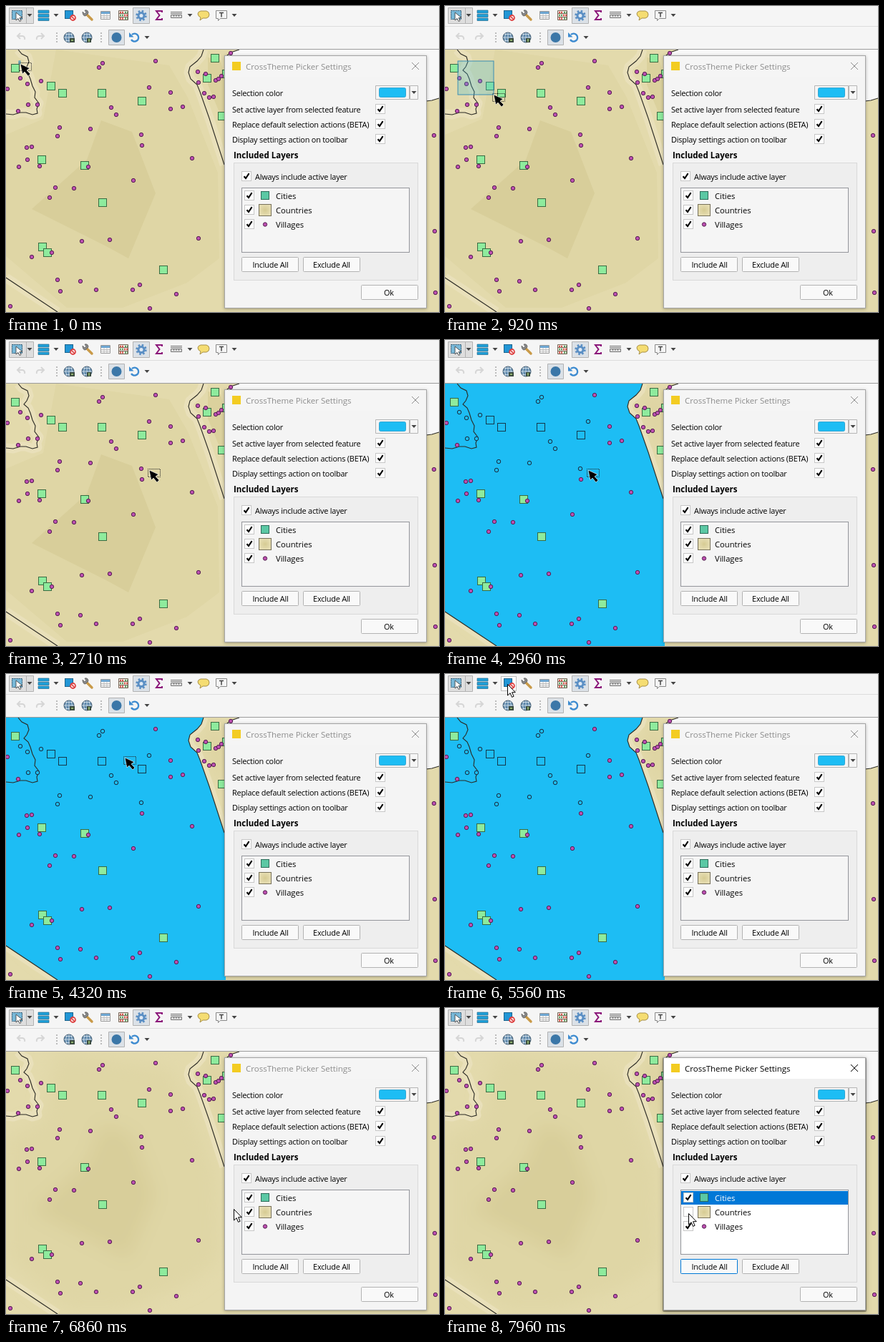
An HTML page for the animation above (8 s loop, 605 by 428 pixels).

```html
<!DOCTYPE html>
<html lang="en">
<head>
<meta charset="utf-8">
<title>Layer selection</title>
<style>
@property --x { syntax: "<number>"; inherits: true; initial-value: 20; }
@property --y { syntax: "<number>"; inherits: true; initial-value: 81; }
html, body { margin: 0; width: 100%; height: 100%; overflow: hidden; background: #f5f5f5; }
svg { display: block; }
text { font: 10.9px "Open Sans", "Noto Sans", sans-serif; letter-spacing: -.22px; fill: #000; }
.list text { font-size: 11.2px; letter-spacing: 0; }
.mid { text-anchor: middle; }
#stage { animation: path 8s step-end infinite; }
#stage [style*="--a"] { animation: var(--a) 8s step-end infinite; }
.at { transform: translate(calc(var(--x) * 1px), calc(var(--y) * 1px)); }
#band { width: calc((var(--x) - 18) * 1px); height: calc((var(--y) - 77) * 1px); }
#dialog { filter: drop-shadow(0 1px 2px rgba(0,0,0,.3)); }

@keyframes path {
  0% { --x: 20; --y: 81 }
  1.5% { --x: 23; --y: 85 }
  3% { --x: 26; --y: 90 }
  4.875% { --x: 33; --y: 95 }
  6.5% { --x: 40; --y: 101 }
  8% { --x: 48; --y: 108 }
  9.625% { --x: 56; --y: 114 }
  11.5% { --x: 68; --y: 124 }
  13% { --x: 80; --y: 133 }
  14.875% { --x: 99; --y: 145 }
  16.625% { --x: 117; --y: 153 }
  18.5% { --x: 136; --y: 159 }
  20.125% { --x: 154; --y: 165 }
  22% { --x: 172; --y: 172 }
  23.5% { --x: 188; --y: 178 }
  25.375% { --x: 195; --y: 181 }
  27% { --x: 200; --y: 182 }
  54% { --x: 166; --y: 117 }
  55.75% { --x: 118; --y: 58 }
  57.375% { --x: 89; --y: 20 }
  59.25% { --x: 87; --y: 14 }
  76.75% { --x: 77; --y: 35 }
  78.625% { --x: 140; --y: 112 }
  80.125% { --x: 203; --y: 190 }
  82% { --x: 253; --y: 246 }
  83.875% { --x: 304; --y: 277 }
  85.75% { --x: 318; --y: 281 }
  87.25% { --x: 333; --y: 290 }
  88.75% { --x: 340; --y: 286 }
  90.625%, 100% { --x: 340; --y: 287 }
}
@keyframes drag { 0% { visibility: visible } 33.875%, 100% { visibility: hidden } }
@keyframes banded { 0% { visibility: visible } 37%, 100% { visibility: hidden } }
@keyframes picked { 0% { visibility: hidden } 37% { visibility: visible } 73%, 100% { visibility: hidden } }
@keyframes smooth { 0% { visibility: hidden } 37%, 100% { visibility: visible } }
@keyframes cross {
  0% { visibility: visible } 55.75% { visibility: hidden }
  78.625% { visibility: visible } 83.875%, 100% { visibility: hidden }
}
@keyframes arrow {
  0% { visibility: hidden } 55.75% { visibility: visible }
  78.625% { visibility: hidden } 85.75%, 100% { visibility: visible }
}
@keyframes resize { 0% { visibility: hidden } 83.875% { visibility: visible } 85.75%, 100% { visibility: hidden } }
@keyframes hover {
  0% { visibility: hidden; fill: #fff } 57.375% { visibility: visible; fill: #fff }
  67.625% { visibility: visible; fill: #d4d8dc } 69.5% { visibility: visible; fill: #fff }
  76.75%, 100% { visibility: hidden; fill: #fff }
}
@keyframes active { 0% { visibility: hidden } 97.625%, 100% { visibility: visible } }
@keyframes ink { 0% { fill: #8c8c8c; stroke: #8c8c8c } 97.625%, 100% { fill: #000; stroke: #000 } }
@keyframes paper { 0% { fill: #f5f5f5 } 97.625%, 100% { fill: #fff } }
@keyframes face { 0% { fill: #f4f4f4 } 97.625%, 100% { fill: #f0f0f0 } }
@keyframes invert { 0% { fill: #000 } 97.625%, 100% { fill: #fff } }
@keyframes uncheck { 0% { visibility: visible } 99.5%, 100% { visibility: hidden } }
</style>
</head>
<body>
<svg id="stage" width="605" height="428" viewBox="0 0 605 428">
  <defs>
    <clipPath id="view"><rect y="61" width="605" height="367"/></clipPath>
    <filter id="soft" x="-20%" y="-20%" width="140%" height="140%"><feGaussianBlur stdDeviation="13"/></filter>
    <radialGradient id="sand"><stop offset="0" stop-color="#d6cb93"/><stop offset="1" stop-color="#e6ddb2"/></radialGradient>
    <path id="drop" d="M-3.5-2h7L0 2z" fill="#444"/>
    <rect id="frame" width="13" height="13" x=".5" y=".5" fill="#fff" stroke="#c6c6c6"/>
    <path id="tick" d="M3.5 7.2 6 10l4.6-6.8" fill="none" stroke="#000" stroke-width="2.1"/>
    <g id="box"><use href="#frame"/><use href="#tick"/></g>
    <g id="grip" fill="#bbb"><path d="M0 0h2v2H0zM0 4h2v2H0zM0 8h2v2H0zM0 12h2v2H0z"/></g>
    <g id="globe"><circle r="7" fill="#5d87ab" stroke="#3c5468"/><path d="M-7 0H7M0-7V7M-5-4.5H5M-5 4.5H5M-3-6Q-6 0-3 6M3-6Q6 0 3 6" fill="none" stroke="#dbe6ee" stroke-width=".8"/></g>
    <path id="coast" d="M17 61l5 6 8 4 2 7-3 7-4 5 6 5 3 7 3 10 4 8-1 8 6 8-3 8 1 6-7 2-9-3h-8l-10 3-10-1"/>
    <path id="east" d="M276 61l-3 9-6 7-10 8-2 8 3 9 9 8 4 10 13 37 21 65"/>
    <path id="north" d="M326 61l-12 4-6 5M587 133l8-1 10-3"/>
    <path id="south" d="M0 380l72 48"/>
    <g id="relief">
      <path d="M70 61l158 22 26 45 42 105 2 120-45 34-90 35H85L0 350V180l52-22z" fill="#dfd6a5"/>
      <path d="M133 160l43 16 33 86-38 91-31-17-104-52 77-69z" fill="#d8ce9a"/>
      <path d="M282 72l18 4 7 30v64l-25-60z" fill="#dbd19d"/>
    </g>
  </defs>

  <g clip-path="url(#view)">
    <rect y="61" width="605" height="367" fill="#e3daac"/>
    <use href="#relief" style="--a:banded"/>
    <use href="#relief" filter="url(#soft)" style="--a:smooth"/>
    <g fill="none" stroke="#e9e0ba" stroke-width="13" stroke-linejoin="round">
      <use href="#coast"/><use href="#east"/><use href="#south"/>
    </g>
    <path d="M326 61l-12 4-6 5 279 63 8-1 10-3V61z" fill="#f8f8f8"/>
    <path d="M0 61h276l-3 9-6 7-10 8-2 8 3 9 9 8 4 10 13 37 21 65 2 206H72L0 380z" fill="#1dbdf4" style="--a:picked"/>
    <g fill="none" stroke="#2b2a24" stroke-width="1.1">
      <use href="#coast"/><use href="#east"/><use href="#north"/><use href="#south"/>
    </g>
    <g id="marks"></g>
    <rect id="band" x="18" y="77" fill="rgba(70,185,215,.28)" stroke="#3b8db4" style="--a:drag"/>
  </g>

  <g id="bars">
    <rect width="605" height="60" fill="#f5f5f5"/>
    <path d="M0 28.5H605" stroke="#dcdcdc"/>
    <path d="M0 60.5H605" stroke="#9c9c9c"/>
    <g fill="#dedede" stroke="#b2b2b2">
      <path d="M4.5 2.5h34v22h-34zM28.5 2.5v22"/>
      <path d="M177.500 2.500h23v22h-23zM143.500 33.500h22v21h-22z" fill="#dbe1e7"/>
    </g>
    <rect x="78.500" y="3.500" width="21" height="20" stroke="#bcbcbc" style="--a:hover"/>
    <rect x="8.500" y="6.500" width="14" height="12" fill="#78b8d8" stroke="#24506c" stroke-dasharray="2 1"/>
    <path d="M14 9v11l3-2.500 2 4 2-1-2-4h4z" fill="#fff" stroke="#333" stroke-width=".8"/>
    <use href="#drop" x="33" y="13"/>
    <path d="M45 6h15v4H45zM45 11.500h15v4H45zM45 17h15v3.500H45z" fill="#1e9fd8" stroke="#256a8d" stroke-width=".7"/>
    <use href="#drop" x="70" y="13"/>
    <rect x="82.500" y="6.500" width="11" height="11" fill="#2196d6" stroke="#1c638c"/>
    <circle cx="93.500" cy="16.500" r="3.600" fill="#f8dada" stroke="#dc3b3b" stroke-width="1.600"/>
    <path d="M91 14l5 5" stroke="#dc3b3b" stroke-width="1.400"/>
    <path d="M113 12l7 7" stroke="#c99a48" stroke-width="3.500" stroke-linecap="round"/>
    <path d="M107 8l3 3 2-2-2-3q5-1 5 4l-4 4q-4 0-4-6" fill="#888" stroke="#555" stroke-width=".7"/>
    <path d="M132.500 7.500h13v11h-13z" fill="#fff" stroke="#9a9a9a"/>
    <path d="M133 8h12v3h-12z" fill="#6ea6d2"/>
    <path d="M133 13.500h12M133 16h12M137 11v7M141 11v7" stroke="#bbb"/>
    <path d="M157.500 6.500h13v13h-13zM158 10.500h12M158 15.500h12" fill="#f4f0ea" stroke="#776657"/>
    <path d="M159 9h5M165 13h5M159 17.500h5" stroke="#d8534c" stroke-width="2.500" stroke-dasharray="2 1"/>
    <path d="M166 9h4M159 13h5M166 17.500h4" stroke="#5b9e62" stroke-width="2.500" stroke-dasharray="2 1"/>
    <circle cx="189" cy="13.500" r="6.200" fill="none" stroke="#5b8fc4" stroke-width="3" stroke-dasharray="2.430"/>
    <circle cx="189" cy="13.500" r="4" fill="#dfeaf5" stroke="#5b8fc4" stroke-width="3"/>
    <path d="M218 9V7h-8l4.500 6-4.500 6h8v-2" fill="none" stroke="#8b1679" stroke-width="2"/>
    <path d="M230 8.500h16M230 10.500h16" stroke="#777"/>
    <path d="M230.500 12.500h15v4h-15zM234.500 13v2M238 13v2M241.500 13v2" fill="#ddd" stroke="#777"/>
    <use href="#drop" x="257" y="13"/>
    <path d="M272 7h8q4 1 4 5t-4 5h-5l-4 3 1-4q-4-2-4-5t4-4z" fill="#f5dd72" stroke="#a8914a"/>
    <path d="M293.500 6.500h15v11h-9l-3 3v-3h-3z" fill="#f4f4f4" stroke="#888"/>
    <path d="M298 9.500h6M301 9.500v6" stroke="#444" stroke-width="1.500"/>
    <use href="#drop" x="319" y="13"/>
    <g fill="none" stroke="#d6d6d6" stroke-width="2">
      <path d="M17 42h6q4 1 3 5M20 38l-4 4 4 4M52 42h-6q-4 1-3 5M49 38l4 4-4 4"/>
    </g>
    <use href="#grip" x="70" y="37"/><use href="#grip" x="132" y="37"/>
    <use href="#globe" x="88" y="44"/><use href="#globe" x="113" y="44"/>
    <path d="M89 45h7v6h-7zM113 45h6v6h-6z" fill="#3c4c3f"/>
    <path d="M91 48h3M116 46v4" stroke="#a8d07c" stroke-width="1.500"/>
    <circle cx="154.500" cy="44" r="7" fill="#3b77a8"/>
    <path d="M175 47a5.500 5.500 0 1 0 1-7" fill="none" stroke="#3d8bd0" stroke-width="2.400"/>
    <path d="M172 37v6.500h6.500z" fill="#3d8bd0"/>
    <use href="#drop" x="197" y="44"/>
  </g>

  <rect x="304" y="69" width="285" height="356" rx="2" fill="rgba(0,0,0,.3)" filter="drop-shadow(0 2px 4px rgba(0,0,0,.4))" style="--a:active"/>
  <g id="dialog">
    <rect x="305.500" y="69.500" width="282" height="353" stroke="#a5a5a5" style="--a:face"/>
    <rect x="306" y="70" width="281" height="29" style="--a:paper"/>
    <rect x="316" y="78" width="12" height="12" fill="#f3cc22"/>
    <text x="335" y="89" style="--a:ink;font-size:11.5px;letter-spacing:0;stroke-width:0">CrossTheme Picker Settings</text>
    <path d="M567 79l10 10M577 79l-10 10" style="--a:ink"/>
    <text x="316" y="126">Selection color</text>
    <path d="M516.500 111.500h47v19h-47zM564.500 111.500h11v19h-11z" fill="#f5f5f5" stroke="#b5b5b5"/>
    <rect x="521.500" y="114.500" width="37" height="13" rx="2" fill="#1dbdf4" stroke="#35a6d2"/>
    <use href="#drop" x="570" y="121"/>
    <text x="316" y="149">Set active layer from selected feature</text>
    <text x="316" y="170">Replace default selection actions (BETA)</text>
    <text x="316" y="191">Display settings action on toolbar</text>
    <use href="#box" x="516" y="137"/><use href="#box" x="516" y="158"/><use href="#box" x="516" y="179"/>
    <text x="318" y="213" style="font-weight:700;font-size:11.5px;letter-spacing:0">Included Layers</text>
    <rect x="318.500" y="219.500" width="257" height="164" fill="#eee" stroke="#d9d9d9"/>
    <use href="#box" x="329" y="231"/>
    <text x="348" y="243">Always include active layer</text>
    <rect x="329.500" y="254.500" width="234" height="90" stroke="#94969b" style="--a:paper"/>
    <rect x="330" y="256" width="233" height="19" fill="#0078d7" style="--a:active"/>
    <g class="list">
      <use href="#box" x="333" y="258"/><use href="#frame" x="333" y="278"/><use href="#box" x="333" y="298"/>
      <use href="#tick" x="333" y="278" style="--a:uncheck"/>
      <rect x="356.500" y="259.500" width="11" height="11" fill="#5bc8a4" stroke="#2e6b59"/>
      <rect x="353.500" y="277.500" width="17" height="16" fill="url(#sand)" stroke="#77715a"/>
      <circle cx="362" cy="305.500" r="2.700" fill="#bd4fb1" stroke="#552350"/>
      <text x="377" y="269.500" style="--a:invert">Cities</text>
      <text x="377" y="289.500">Countries</text>
      <text x="377" y="310">Villages</text>
    </g>
    <g fill="#f9f9f9" stroke="#b3b3b3">
      <rect x="329.500" y="351.500" width="79" height="20" rx="1"/>
      <rect x="415.500" y="351.500" width="79" height="20" rx="1"/>
      <rect x="496.500" y="390.500" width="79" height="20" rx="1"/>
      <rect x="329.500" y="351.500" width="79" height="20" rx="1" stroke="#0078d7" style="--a:active"/>
    </g>
    <g class="mid">
      <text x="369.500" y="366">Include All</text>
      <text x="455" y="366">Exclude All</text>
      <text x="535" y="405">Ok</text>
    </g>
  </g>

  <g class="at">
    <g style="--a:cross">
      <rect x="-1.500" y="-1.500" width="17" height="11" fill="none" stroke="#222" stroke-dasharray="1 1" stroke-dashoffset=".5"/>
      <path d="M0 0l3 14 3-3 5 6 3-3-5-5 4-3z" fill="#000" stroke="#fff" stroke-width=".6"/>
    </g>
    <path d="M.5.5v15.500l3.600-3.400 2.400 5.800 2.600-1.100-2.500-5.600h4.700z" fill="#fff" stroke="#000" style="--a:arrow"/>
    <path d="M-11 .5l5-4v3H7v-3l5 4-5 4v-3H-6v3z" fill="#fff" stroke="#000" stroke-width=".9" style="--a:resize"/>
  </g>
</svg>
<script>
const marks = document.getElementById("marks");
const cities = [13,87, 63,112, 79,122, 134,122, 190,133, 50,215, 110,223, 135,275,
  51,337, 58,345, 220,369, 292,73, 281,101, 302,154, 308,95];
const west = [135,80, 130,86, 209,77, 20,101, 49,105, 30,109, 2,116, 44,138, 31,138, 17,147,
  200,114, 230,121, 147,142, 154,152, 230,144, 247,141, 75,170, 72,182, 118,172, 189,180,
  190,195, 29,198, 36,197, 47,224, 18,225, 30,215, 115,225, 178,244, 69,254, 61,268, 95,255];
const rest = [64,345, 36,351, 106,329, 145,327, 269,325, 260,213, 72,383, 104,385, 76,399,
  126,397, 187,390, 177,397, 238,403, 201,423, 6,420, 268,92, 279,95, 269,107, 293,104,
  297,102, 277,122, 284,128, 290,127, 301,98, 314,66, 598,181, 599,315, 600,401];

const square = (x, y) => `<rect x="${x - 5.5}" y="${y - 5.5}" width="11" height="11"`;
const dot = (x, y) => `<circle cx="${x}" cy="${y}" r="2.7"`;
const inBand = (x, y) => x >= 18 && x <= 201 && y >= 77 && y <= 182;

function plot(points, shape, fill, stroke) {
  let out = "";
  for (let i = 0; i < points.length; i += 2) {
    const [x, y] = [points[i], points[i + 1]];
    out += `${shape(x, y)} fill="${fill}" stroke="${stroke}"/>`;
    if (inBand(x, y)) out += `${shape(x, y)} fill="#1dbdf4" stroke="#15384a" style="--a:picked"/>`;
  }
  return out;
}

marks.innerHTML = plot(cities, square, "#8eeb9d", "#3a6b42") +
  plot([...west, ...rest], dot, "#bd4fb1", "#552350");
</script>
</body>
</html>
```
